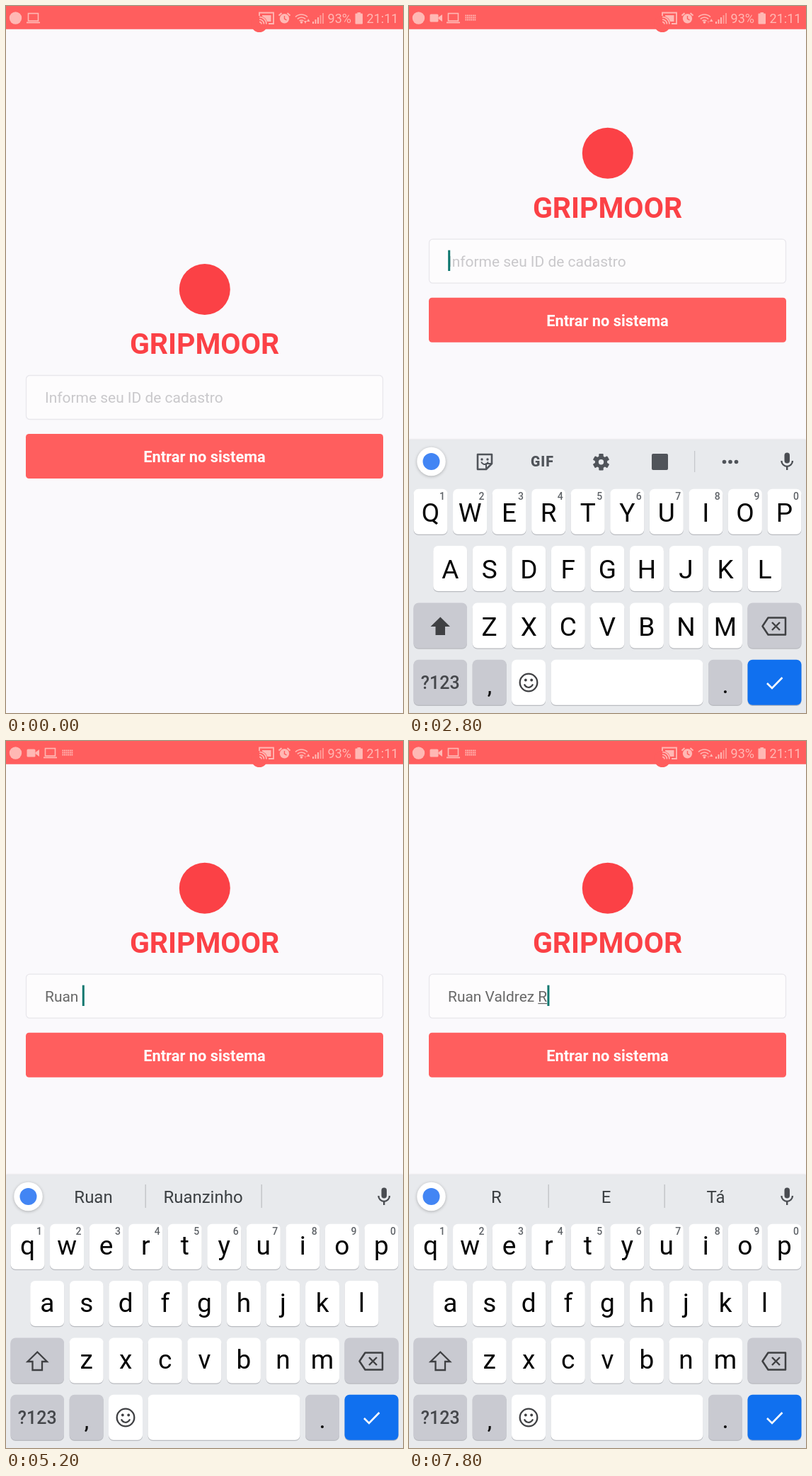
Recreate the animation shown at these times as an HTML page with a canvas. Size 561 by 998 pixels, loop 8 s.

```html
<!DOCTYPE html>
<html lang="pt-BR">
<head>
<meta charset="utf-8">
<title>Login</title>
<style>
html, body { margin: 0; width: 100%; height: 100%; overflow: hidden; background: #faf9fc; }
canvas { display: block; width: 561px; height: 998px; }
</style>
</head>
<body>
<canvas id="stage"></canvas>
<script>
const W = 561, H = 998, LOOP = 8000, STEP = 200;
const RED = '#ff5e5e', LOGO = '#fb4146', TEAL = '#0d776f';
const BOARD = '#e8eaed', KEY_GRAY = '#c9cad1', INK = '#3c4043';
const ROWS = [
  { keys: 'qwertyuiop', x: 30.5, y: 681.7 },
  { keys: 'asdfghjkl', x: 58.2, y: 762 },
  { keys: 'zxcvbnm', x: 113.7, y: 842.5 }
];
const PITCH = 55.55, KEY_W = 48, KEY_H = 64;

const canvas = document.getElementById('stage');
const dpr = window.devicePixelRatio || 1;
canvas.width = W * dpr;
canvas.height = H * dpr;
const c = canvas.getContext('2d');

const START = {
  caret: false, lift: 0, board: 0, kbIcon: false, down: true, up: true,
  text: '', hints: null, pop: '', panel: false, shift: true, space: false
};
// Each entry changes part of the state from its time on.
const EVENTS = [
  [1400, { caret: true }],
  [1600, { board: 0.5 }],
  [1800, { board: 1, lift: 192.3, caret: false }],
  [2000, { kbIcon: true }],
  [2400, { caret: true }],
  [2800, { down: false }],
  [3000, { pop: 'r' }],
  [3200, { text: 'R', pop: '', shift: false, hints: ['R', 'E', 'Tá'] }],
  [3400, { pop: 'u' }],
  [3600, { text: 'Ru', pop: '', hints: ['Ru', 'Rú', 'Ruan'] }],
  [3800, { pop: 'a' }],
  [4200, { panel: true, caret: false }],
  [4600, { text: 'Rua', pop: '', panel: false, caret: true, hints: ['Rua', 'Ruas', 'Ruan'] }],
  [4800, { pop: 'n' }],
  [5000, { text: 'Ruan', pop: '', hints: ['Ruan', 'Ruanzinho', ''] }],
  [5200, { text: 'Ruan ' }],
  [5400, { shift: true }],
  [5600, { caret: false }],
  [5800, { pop: 'v', caret: true }],
  [6000, { text: 'Ruan V', pop: 'a', shift: false, hints: ['V', 'Vai', 'Você'] }],
  [6200, { text: 'Ruan Va', pop: 'l', hints: ['Va', 'Vai', 'Vá'] }],
  [6400, { text: 'Ruan Vald', pop: 'r', hints: ['Vald', 'Vale', 'Valor'] }],
  [6600, { text: 'Ruan Valdre', pop: 'z', hints: ['Valdre', 'Valdrez', ''] }],
  [6800, { text: 'Ruan Valdrez', pop: '', up: false, hints: ['Valdrez'] }],
  [7000, { space: true }],
  [7200, { text: 'Ruan Valdrez ', space: false, up: true, hints: ['E', 'De', 'Da'] }],
  [7400, { shift: true }],
  [7600, { pop: 'r' }],
  [7800, { text: 'Ruan Valdrez R', pop: '', shift: false, hints: ['R', 'E', 'Tá'] }]
];

function stateAt(t) {
  return EVENTS.reduce((s, [at, change]) => t >= at ? Object.assign(s, change) : s, { ...START });
}

function rect(x, y, w, h, color, r = 0) {
  c.fillStyle = color;
  c.beginPath();
  c.roundRect(x, y, w, h, r);
  c.fill();
}

function disc(x, y, r, color) {
  c.fillStyle = color;
  c.beginPath();
  c.arc(x, y, r, 0, Math.PI * 2);
  c.fill();
}

function ring(x, y, r, color, width, from = 0, to = Math.PI * 2) {
  c.strokeStyle = color;
  c.lineWidth = width;
  c.beginPath();
  c.arc(x, y, r, from, to);
  c.stroke();
}

function trace(points, close) {
  c.beginPath();
  points.forEach(([x, y]) => c.lineTo(x, y));
  if (close) c.closePath();
}

function line(points, color, width, close = false) {
  trace(points, close);
  c.strokeStyle = color;
  c.lineWidth = width;
  c.stroke();
}

function shape(points, color) {
  trace(points, true);
  c.fillStyle = color;
  c.fill();
}

function label(text, x, y, size, color, weight = 400, align = 'center') {
  c.font = `${weight} ${size}px Roboto, "Open Sans", sans-serif`;
  c.textAlign = align;
  c.fillStyle = color;
  c.fillText(text, x, y);
}

function withShadow(blur, dy, alpha, draw) {
  c.save();
  c.shadowColor = `rgba(0,0,0,${alpha})`;
  c.shadowBlur = blur * dpr;
  c.shadowOffsetY = dy * dpr;
  draw();
  c.restore();
}

/* Status bar */

function laptop(x, color) {
  c.strokeStyle = color;
  c.lineWidth = 1.6;
  c.strokeRect(x - 7, 10.5, 14, 10.5);
  rect(x - 9.5, 22.5, 19, 1.8, color);
}

function camera(x, scale, color) {
  c.save();
  c.translate(x, 17);
  c.scale(scale, scale);
  rect(-9, -5.5, 12, 11, color, 1.5);
  shape([[3, -1], [8.5, -5], [8.5, 5], [3, 1]], color);
  c.restore();
}

function tinyKeyboard(x, color) {
  for (let row = 0; row < 3; row++) {
    for (let i = 0; i < 6; i++) rect(x - 7.5 + i * 2.6, 12.5 + row * 3, 1.8, 2, color);
  }
}

function castIcon(color) {
  rect(362, 13, 12.5, 9, color);
  disc(358, 25.5, 11.5, RED);
  line([[358, 14], [358, 9.5], [378, 9.5], [378, 25], [371, 25]], color, 1.8);
  [3, 6.5, 10].forEach(r => ring(358, 25.5, r, color, 1.7, -Math.PI / 2, 0));
}

function alarm(x, y, color) {
  line([[x - 8, y - 3.5], [x - 4, y - 7]], color, 2);
  line([[x + 4, y - 7], [x + 8, y - 3.5]], color, 2);
  disc(x, y + .7, 6.7, color);
  line([[x, y - 3], [x, y + 1], [x + 3, y + 2.8]], RED, 1.4);
}

function wifi(s, color) {
  const a = Math.PI * 1.25, b = Math.PI * 1.75;
  [4, 8, 12].forEach(r => ring(417.5, 24, r, color, 1.7, a, b));
  disc(417.5, 23, 1.8, color);
  const dim = 'rgba(255,255,255,.2)';
  shape([[421, 21], [425, 21], [423, 25]], s.down ? color : dim);
  shape([[425, 22], [429.5, 22], [427.2, 18]], s.up ? color : dim);
}

function statusBar(s, t) {
  const color = '#ffb8b4';
  const p = Math.min(t / 600, 1);
  rect(0, 0, W, 32.7, RED);
  disc(13.5, 17, 8.7, color);
  if (p > 0) camera(38.5, p, color);
  laptop(38.5 + 24 * p, color);
  if (s.kbIcon) tinyKeyboard(87, color);

  castIcon(color);
  alarm(393.5, 17, color);
  wifi(s, color);
  for (let i = 0; i < 5; i++) {
    const h = 3 + i * 3;
    rect(433 + i * 3.5, 25 - h, 2, h, i < 3 ? color : '#ff9894');
  }
  label('93%', 471.3, 24.3, 18, color);
  rect(496.5, 9, 4.5, 3, color);
  rect(493.5, 10.5, 10.5, 15, color, 1);
  label('21:11', 532, 24.3, 18, color);
}

/* Login form */

function form(s) {
  c.save();
  c.translate(0, -s.lift);
  disc(280.8, 400, 36, LOGO);
  label('GRIPMOOR', 280.5, 490.8, 41, LOGO, 700);

  rect(28.5, 521.5, 504, 62, '#fdfcfd', 5);
  c.strokeStyle = '#e8e7ec';
  c.lineWidth = 1.3;
  c.stroke();

  const x = 55, size = 20.95;
  let end = x;
  if (s.text) {
    label(s.text, x, 560, size, '#686868', 400, 'left');
    end += c.measureText(s.text).width;
    const cut = s.text.lastIndexOf(' ') + 1;
    const from = x + c.measureText(s.text.slice(0, cut)).width;
    if (end > from && cut < s.text.length) rect(from, 562.2, end - from, 1.3, '#686868');
  } else {
    label('Informe seu ID de cadastro', x, 560, size, '#c9c8cb', 400, 'left');
  }
  if (s.caret) rect(end + .2, 537, 3, 29.3, TEAL);

  rect(28, 604, 505, 63, RED, 4.5);
  label('Entrar no sistema', 280.5, 644, 21.8, '#fff', 700);
  c.restore();
}

/* Keyboard */

function key(x, y, w, color) {
  rect(x, y + 1.3, w, KEY_H, '#b9bbc0', 7);
  rect(x, y, w, KEY_H, color, 7);
}

function toolbar() {
  const g = '#50545a';
  c.lineJoin = 'round';
  line([[97, 633], [117, 633], [117, 646], [109, 654], [97, 654]], g, 2.6, true);
  line([[109, 654], [109, 646], [117, 646]], g, 2);
  disc(103, 640, 1.7, g);
  disc(111, 640, 1.7, g);
  ring(107, 642, 5, g, 2, .3, Math.PI - .3);

  c.letterSpacing = '1px';
  label('GIF', 188.5, 650, 19.5, g, 900);
  c.letterSpacing = '0px';

  for (let i = 0; i < 6; i++) {
    c.save();
    c.translate(271.5, 643.7);
    c.rotate(i * Math.PI / 3);
    rect(-3.2, -11.7, 6.4, 7, g, 1);
    c.restore();
  }
  ring(271.5, 643.7, 6.2, g, 5);

  rect(343, 632, 23, 23, g, 2);
  rect(403, 628, 1.3, 30, '#c6c8cc');
  [445.5, 454, 462.5].forEach(x => disc(x, 643.5, 2.8, g));
}

function hintBar(hints) {
  if (hints.length === 1) {
    label(hints[0], 279.5, 652, 24, INK);
    return;
  }
  hints.forEach((h, i) => label(h, 123.5 + i * 155, 652, 24, INK));
  [197, 361].forEach(x => rect(x - .5, 626, 1.4, 33, '#c1c3c7'));
}

function mic() {
  const g = '#4a4d52';
  rect(530.5, 630.5, 7.5, 15, g, 3.75);
  ring(534.2, 642, 7.8, g, 2.3, 0, Math.PI);
  line([[534.2, 650], [534.2, 655]], g, 2.4);
}

function shiftIcon(on) {
  const pts = [[44.3, 862.5], [58, 876], [51, 876], [51, 888], [37.5, 888], [37.5, 876], [30.5, 876]];
  c.lineJoin = 'miter';
  if (on) shape(pts, '#3f4043');
  else line(pts, '#3f4043', 2.3, true);
}

function letterRows(s) {
  ROWS.forEach((row, r) => [...row.keys].forEach((k, i) => {
    const x = row.x + i * PITCH;
    key(x - KEY_W / 2, row.y, KEY_W, '#fff');
    const y = row.y + (s.shift ? 46.3 : 43.7);
    label(s.shift ? k.toUpperCase() : k, x, y, 37, '#050505');
    if (r === 0) label((i + 1) % 10, x + 16.5, row.y + 15.6, 14, '#5f6368', 500);
  }));
}

function controlKeys(s) {
  const dark = '#3f4043';
  key(6.5, 842.5, 75.5, KEY_GRAY);
  shiftIcon(s.shift);
  key(478.5, 842.5, 76, KEY_GRAY);
  c.lineJoin = 'round';
  line([[499.5, 875.5], [507.5, 863.5], [532, 863.5], [532, 887.5], [507.5, 887.5]], dark, 2.5, true);
  line([[513, 870], [524, 881]], dark, 2.4);
  line([[524, 870], [513, 881]], dark, 2.4);

  const y = 922.8;
  key(6.5, y, 75.5, KEY_GRAY);
  label('?123', 44.2, 964, 25, '#45474b', 500);
  key(89.7, y, KEY_W, KEY_GRAY);
  label(',', 114, 970, 29, '#111', 500);
  key(145, y, KEY_W, '#fff');
  ring(169, 955, 12.3, dark, 2.3);
  disc(164.8, 951.5, 1.9, dark);
  disc(173.2, 951.5, 1.9, dark);
  ring(169, 955.5, 6.3, dark, 2.2, .3, Math.PI - .3);
  key(200.5, y, 215, s.space ? KEY_GRAY : '#fff');
  key(423, y, KEY_W, KEY_GRAY);
  label('.', 447, 970, 29, '#111', 500);
  key(478.5, y, 76, '#1070ef');
  c.lineJoin = 'miter';
  line([[506, 956], [513, 963], [527.5, 948]], '#fff', 2.6);
}

function popup(s) {
  const row = ROWS.find(r => r.keys.includes(s.pop));
  const x = row.x + row.keys.indexOf(s.pop) * PITCH;
  const top = row.y - 97;
  const show = ch => s.shift ? ch.toUpperCase() : ch;
  withShadow(6, 2, .35, () => rect(x - 28.5, top, 57, 161, KEY_GRAY, 6));
  if (s.panel) {
    withShadow(6, 1, .3, () => rect(x - 28.5, top, 226, 73, KEY_GRAY, 6));
    rect(x - 26, top + 3, 52, 67, '#1070ef', 6);
    [...'aáãà'].forEach((ch, i) => label(ch, x + i * 56, top + 53, 37, i ? '#050505' : '#fff'));
    return;
  }
  label(show(s.pop), x, top + 53, 37, '#050505');
  if ('aeioucn'.includes(s.pop)) {
    [-4.7, 0, 4.7].forEach(d => rect(x + 14.5 + d, top + 66.5, 2.6, 2.6, '#222'));
  }
}

function keyboard(s) {
  if (!s.board) return;
  c.save();
  c.translate(0, (1 - s.board) * (H - 612));
  withShadow(3, -1, .16, () => rect(0, 612.5, W, H - 612, BOARD));
  withShadow(4, 1, .25, () => disc(31.5, 643, 20.3, '#fff'));
  disc(31.5, 643, 12, '#4285f4');
  if (s.hints) hintBar(s.hints);
  else toolbar();
  mic();
  letterRows(s);
  controlKeys(s);
  if (s.pop) popup(s);
  c.restore();
}

function draw(t) {
  const s = stateAt(t);
  c.setTransform(dpr, 0, 0, dpr, 0, 0);
  rect(0, 0, W, H, '#faf9fc');
  form(s);
  keyboard(s);
  statusBar(s, t);
}

const begin = performance.now();
function tick(now) {
  const t = Math.max(0, now - begin) % LOOP;
  draw(Math.floor(t / STEP) * STEP);
  requestAnimationFrame(tick);
}
draw(0);
requestAnimationFrame(tick);
</script>
</body>
</html>
```
